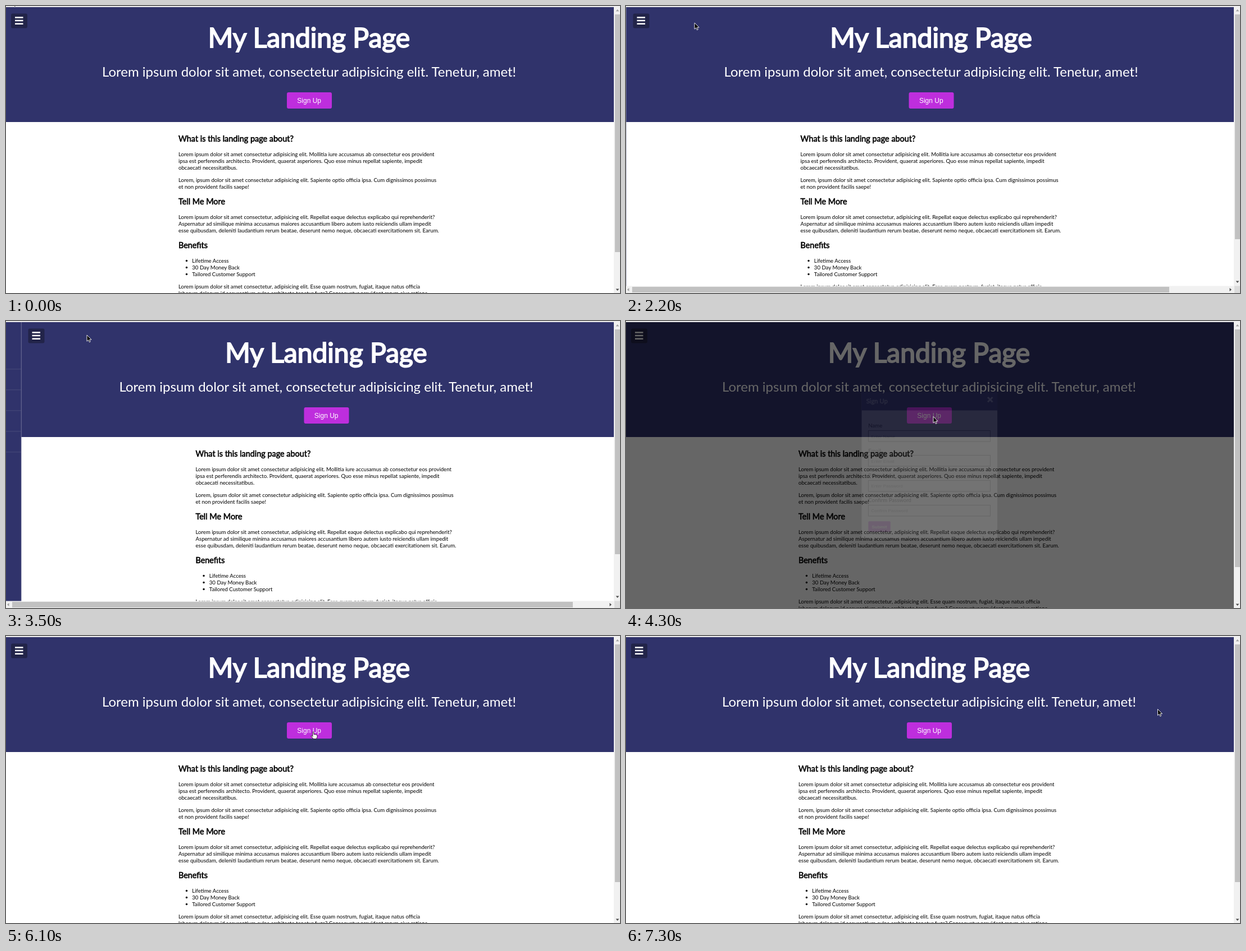
These frames come from a looping animation (1093 px wide and 512 px high, 8000 ms). An HTML page:

```html
<!DOCTYPE html>
<html lang="en">
<head>
<meta charset="utf-8">
<title>My Landing Page</title>
<style>
html, body { margin: 0; width: 100%; height: 100%; overflow: hidden; background: #fff; }
svg { display: block; font: 9.6px Lato, sans-serif; }
.title, .subtitle, .center { text-anchor: middle; }
.white, .title, .subtitle { fill: #fff; }
.title { font-size: 48px; stroke: #fff; stroke-width: 2px; }
.subtitle { font-size: 24px; }
.heading { font-size: 14.4px; stroke: #000; stroke-width: .6px; }
.modal-title { font-size: 11.23px; fill: #fff; stroke: #fff; stroke-width: .5px; }
.button, .hint, .submit { font-family: "Liberation Sans", Arial, sans-serif; }
.button { font-size: 12px; }
.hint, .submit { font-size: 8px; }
.hint { fill: #757575; }
.submit { font-weight: 700; }
</style>
</head>
<body>
<svg width="1093" height="512" viewBox="0 0 1093 512">
  <clipPath id="round"><circle cx="57.3" cy="43" r="22.5"/></clipPath>
  <rect width="1093" height="512" fill="#fff"/>
  <g id="page">
    <rect x="-3.2" y="1" width="1200" height="206" fill="#30336b"/>
    <rect x="9" y="13.5" width="29" height="26" rx="3" fill="#222449"/>
    <path d="M16 20.5h14.5m-14.5 5.6h14.5m-14.5 5.6h14.5" stroke="#fff" stroke-width="2.5"/>
    <rect x="500" y="154" width="80" height="29" rx="3" fill="#be2edd"/>
    <g id="copy"></g>
  </g>
  <g id="nav">
    <rect x="-3.2" y="1" width="121" height="511" fill="#30336b"/>
    <path d="M117.3 2v510M-3.2 85.8h120.5m-120.5 37h120.5m-120.5 37h120.5m-120.5 37h120.5m-120.5 37h120.5" stroke="#c8c8c8" stroke-opacity=".15"/>
    <g clip-path="url(#round)">
      <rect x="34" y="20" width="46" height="46" fill="#b9bcc4"/>
      <circle cx="57.3" cy="39" r="8" fill="#696c78"/>
      <ellipse cx="57.3" cy="64" rx="16" ry="15" fill="#696c78"/>
    </g>
    <g id="links"></g>
  </g>
  <g id="modal">
    <rect y="1" width="1083" height="511" fill-opacity=".6"/>
    <g id="dialog">
      <rect x="419.5" y="127" width="241.5" height="261" fill="#fff"/>
      <rect x="419.5" y="127" width="241.5" height="32.5" fill="#30336b"/>
      <path d="M644 136l8.5 8.5m0-8.5l-8.5 8.5" stroke="#fff" stroke-width="3"/>
      <g id="fields"></g>
      <rect x="431.3" y="357.3" width="39.5" height="18.7" rx="2" fill="#be2edd"/>
      <text class="submit white center" x="451" y="369.7">Submit</text>
    </g>
  </g>
  <rect width="1083" height="2" fill="#ececec"/>
  <rect x="1082" width="11" height="512" fill="#f1f1f1"/>
  <rect id="vThumb" x="1084" y="15" width="9" fill="#c1c1c1"/>
  <path d="M1085.5 9.5h6l-3-3.5z" fill="#a3a3a3"/>
  <path id="down" d="M1085.5 504.5h6l-3 3.5z" fill="#505050"/>
  <g id="hBar">
    <rect y="499.5" width="1083" height="13" fill="#f1f1f1"/>
    <rect x="1083" y="499.5" width="10" height="13" fill="#dcdcdc"/>
    <rect id="hThumb" x="11" y="501" height="10" fill="#c1c1c1"/>
    <path d="M5.5 503v6l-3.5-3z" fill="#a3a3a3"/>
    <path d="M1074.5 503v6l3.5-3z" fill="#505050"/>
  </g>
  <g id="cursor" stroke-linejoin="round">
    <path id="arrow" d="M0 0v11.2l2.6-2.4 1.8 4 1.8-.8-1.7-3.8h3.6z" fill="#000" stroke="#fff" stroke-width=".9"/>
    <path id="hand" d="M-1 1q1-1.6 2 0v4q4.8-.2 6 1.8v3l-1.5 3.2h-5L-4 8.5q0-1.8 1.6-1L-1 9z" fill="#fff" stroke="#111" stroke-width=".8"/>
  </g>
</svg>
<script>
const $ = id => document.getElementById(id);

function write(parent, x, y, text, kind = "") {
  const el = document.createElementNS("http://www.w3.org/2000/svg", "text");
  el.setAttribute("x", x);
  el.setAttribute("y", y);
  el.setAttribute("class", kind);
  el.textContent = text;
  $(parent).append(el);
}

function writeLines(parent, x, y, gap, lines, kind) {
  lines.forEach((line, i) => write(parent, x, y + i * gap, line, kind));
}

write("copy", 539.5, 74, "My Landing Page", "title");
write("copy", 539.5, 126, "Lorem ipsum dolor sit amet, consectetur adipisicing elit. Tenetur, amet!", "subtitle");
write("copy", 539.7, 173, "Sign Up", "button white center");
write("copy", 307, 242, "What is this landing page about?", "heading");
writeLines("copy", 307, 268, 12, [
  "Lorem ipsum dolor sit amet consectetur adipisicing elit. Mollitia iure accusamus ab consectetur eos provident",
  "ipsa est perferendis architecto. Provident, quaerat asperiores. Quo esse minus repellat sapiente, impedit",
  "obcaecati necessitatibus."]);
writeLines("copy", 307, 314, 12, [
  "Lorem, ipsum dolor sit amet consectetur adipisicing elit. Sapiente optio officia ipsa. Cum dignissimos possimus",
  "et non provident facilis saepe!"]);
write("copy", 307, 354, "Tell Me More", "heading");
writeLines("copy", 307, 380, 12, [
  "Lorem ipsum dolor sit amet consectetur, adipisicing elit. Repellat eaque delectus explicabo qui reprehenderit?",
  "Aspernatur ad similique minima accusamus maiores accusantium libero autem iusto reiciendis ullam impedit",
  "esse quibusdam, deleniti laudantium rerum beatae, deserunt nemo neque, obcaecati exercitationem sit. Earum."]);
write("copy", 307, 432, "Benefits", "heading");
writeLines("copy", 331.3, 458, 12, ["Lifetime Access", "30 Day Money Back", "Tailored Customer Support"]);
writeLines("copy", 307, 504, 12, [
  "Lorem ipsum dolor sit amet consectetur, adipisicing elit. Esse quam nostrum, fugiat, itaque natus officia",
  "laborum dolorum id accusantium culpa architecto tenetur fuga? Consequatur provident rerum eius ratione"]);
for (const y of [454.5, 466.5, 478.5])
  $("copy").innerHTML += `<circle cx="321.5" cy="${y}" r="1.7"/>`;

writeLines("links", 9, 108, 37, ["Home", "Portfolio", "Blog", "Contact Me"], "white");

write("fields", 427.8, 147, "Sign Up", "modal-title");
["Name", "Email", "Password", "Confirm Password"].forEach((label, i) => {
  const y = i * 44.3;
  $("fields").innerHTML += `<rect x="431.5" y="${Math.round(y) + 195.5}" width="217" height="19.5" fill="#fff" stroke="#666"/>`;
  write("fields", 431.3, 190.2 + y, label);
  write("fields", 436.3, 208.5 + y, label.startsWith("Confirm") ? label : "Enter " + label, "hint");
});

// CSS "ease" curve, solved by bisection
function ease(p) {
  if (p <= 0) return 0;
  if (p >= 1) return 1;
  const bez = (a, b, u) => 3 * a * u * (1 - u) ** 2 + 3 * b * u * u * (1 - u) + u ** 3;
  let lo = 0, hi = 1;
  for (let i = 0; i < 30; i++) {
    const mid = (lo + hi) / 2;
    if (bez(.25, .25, mid) < p) lo = mid; else hi = mid;
  }
  return bez(.1, 1, lo);
}

const LOOP = 8000, STEP = 100, MENU = 121, SLIDE = 220, FADE = 960;
const menuTimes = [[1075, 2028], [2770, 3401]];
const modalTimes = [[4210, 5190], [6120, 7150]];
const thumbEnds = [[0, 1056], [1500, 967], [2800, 1056], [3000, 967], [3500, 1009], [3600, 1050]];

// time, x, y, 1 for the hand
const path = [
  [0, 11, -11, 0], [100, 11, -11, 0], [800, 20.5, 30, 1], [1200, 20.5, 30, 0],
  [1400, 20.5, 30, 0], [1800, 143, 28, 1], [2100, 143, 28, 0], [2200, 122, 30, 0],
  [2500, 20, 30, 1], [2900, 20, 30, 0], [3300, 144, 25, 1], [3500, 144, 25, 0],
  [3700, 520, 185, 0], [3800, 520, 185, 0], [4100, 547, 170.5, 1], [4300, 547, 170.5, 0],
  [4700, 645, 165, 0], [5000, 648, 141, 1], [5200, 648, 141, 0], [5400, 648, 141, 0],
  [5900, 547, 170.5, 1], [6200, 547, 170.5, 0], [6400, 547, 170.5, 0], [6900, 946.5, 130.5, 0],
  [LOOP, 946.5, 130.5, 0]];

const show = (id, on) => $(id).setAttribute("display", on ? "inline" : "none");
const move = (id, x, y = 0) => $(id).setAttribute("transform", `translate(${x} ${y})`);

function draw(t) {
  let shift = 0;
  for (const [open, close] of menuTimes)
    shift += MENU * (ease((t - open) / SLIDE) - ease((t - close) / SLIDE));
  const scrolls = shift > .01;
  move("page", shift);
  move("nav", shift - MENU);
  show("hBar", scrolls);
  $("hThumb").setAttribute("width", thumbEnds.findLast(k => k[0] <= t)[1] - 11);
  $("vThumb").setAttribute("height", scrolls ? 401 : 424);
  move("down", 0, scrolls ? -14 : 0);

  const modal = modalTimes.find(([open, close]) => t >= open && t < close);
  show("modal", modal);
  if (modal) $("dialog").setAttribute("opacity", ease((t - modal[0]) / FADE));

  const i = path.findLastIndex(k => k[0] <= t);
  const [t0, x0, y0, hand] = path[i], [t1, x1, y1] = path[i + 1];
  const p = (t - t0) / (t1 - t0);
  move("cursor", x0 + (x1 - x0) * p, y0 + (y1 - y0) * p);
  show("hand", hand);
  show("arrow", !hand);
}

// Ten pictures per second
const start = performance.now();
function tick() {
  const t = (performance.now() - start) % LOOP;
  draw(Math.floor(t / STEP) * STEP);
  requestAnimationFrame(tick);
}
tick();
</script>
</body>
</html>
```
